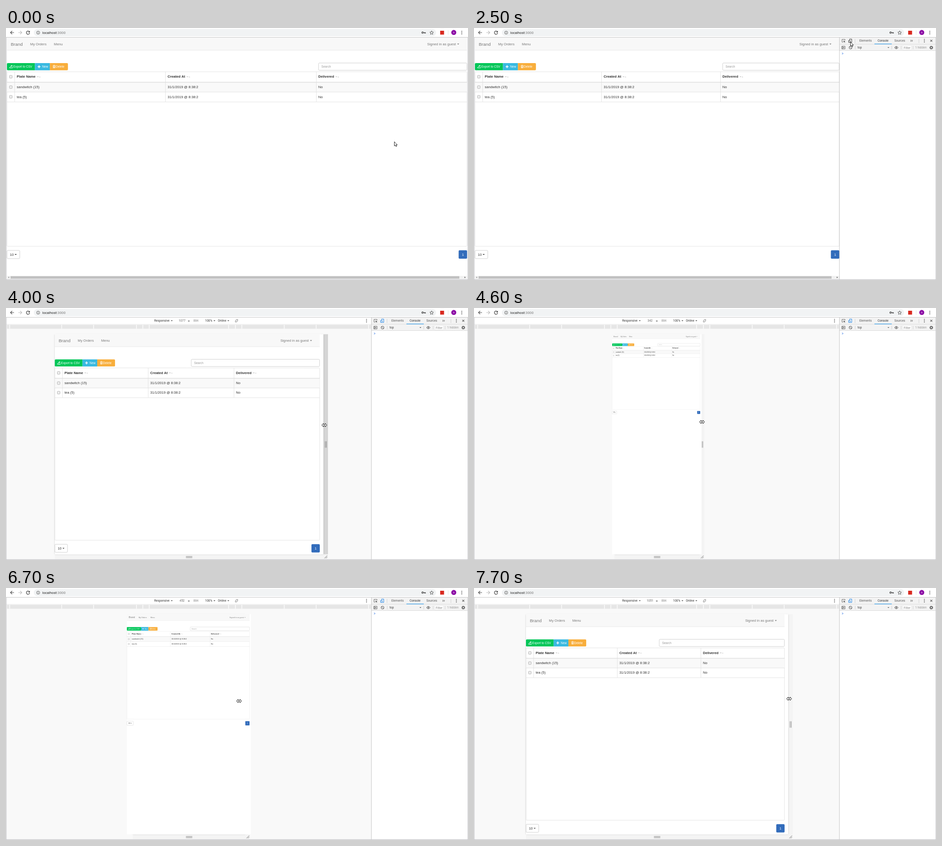
Recreate the animation shown at these times as an HTML page with a canvas. Size 1013 by 553 pixels, loop 8000 ms.

```html
<!DOCTYPE html>
<html lang="en">
<head>
<meta charset="utf-8">
<title>Orders</title>
<style>
html, body { margin: 0; width: 100%; height: 100%; overflow: hidden; background: #fff; }
canvas { display: block; }
</style>
</head>
<body>
<canvas id="stage" width="1013" height="553"></canvas>
<script>
const ctx = document.getElementById('stage').getContext('2d');
const LOOP = 8000;
const SANS = '"Liberation Sans", Arial, sans-serif';
const UI = 'Roboto, sans-serif';

// Pointer stops before the drag: time, x, y
const POINTER = [[0, 851, 249], [500, 795, 254], [700, 795, 255]];
// Drag stops: time, device left, page left, cursor x, cursor y
const DRAG = [
  [2700, 107, 107, 698, 257],
  [4300, 200, 192, 608, 254],
  [4600, 308, 303, 500, 250],
  [5000, 348, 344, 460, 246],
  [5200, 351, 351, 457, 244],
  [5600, 259, 267, 559, 241],
  [6400, 111, 107, 695, 245],
  [6700, 278, 265, 511, 248],
  [7000, 312, 313, 498, 247],
  [7400, 160, 166, 650, 244],
  [7700, 114, 114, 691, 243]
];

const at = (stops, t) => stops.filter(s => s[0] <= t).pop();

function rect(x, y, w, h, color) {
  ctx.fillStyle = color;
  ctx.fillRect(x, y, w, h);
}

function box(x, y, w, h, r, fill, stroke, lineWidth = 0.8) {
  ctx.beginPath();
  ctx.roundRect(x, y, w, h, r);
  ctx.fillStyle = fill;
  ctx.fill();
  if (!stroke) return;
  ctx.strokeStyle = stroke;
  ctx.lineWidth = lineWidth;
  ctx.stroke();
}

// y is the middle of the capitals
function text(str, x, y, size, color, font = SANS, align = 'left', weight = '') {
  ctx.font = `${weight} ${size}px ${font}`;
  ctx.textAlign = align;
  ctx.fillStyle = color;
  ctx.fillText(str, x, y + size * 0.36);
  return ctx.measureText(str).width;
}

function icon(d, x, y, stroke, fill, lineWidth = 1) {
  const path = new Path2D(d);
  ctx.save();
  ctx.translate(x, y);
  if (fill) { ctx.fillStyle = fill; ctx.fill(path); }
  if (stroke) { ctx.strokeStyle = stroke; ctx.lineWidth = lineWidth; ctx.stroke(path); }
  ctx.restore();
}

const caret = (x, y, color, r = 2.2, dir = 1) =>
  icon(`M${-r} ${-dir * r / 2}H${r}L0 ${dir * r / 2}Z`, x, y, null, color);

const circle = r => `M${r} 0A${r} ${r} 0 1 1 ${-r} 0A${r} ${r} 0 1 1 ${r} 0Z`;

function dots(x, y, color) {
  for (const dy of [-3, 0, 3]) icon(circle(0.9), x, y + dy, null, color);
}

function page(x, y, W, k) {
  const size = 7.66, small = 6.56;
  ctx.save();
  ctx.translate(x, y);
  ctx.scale(k, k);

  rect(0, 0, W, 28, '#f8f8f8');
  rect(0, 27.4, W, 0.8, '#e3e3e3');
  text('Brand', 8.5, 14, 9.85, '#777');
  text('My Orders', 51, 14, size, '#777');
  text('Menu', 103, 14, size, '#777');
  text('Signed in as guest', W - 87.5, 14, size, '#777');
  caret(W - 19.5, 14.3, '#777');

  box(0, 56, 61.5, 15.8, [2, 0, 0, 2], '#00c658');
  rect(61.5, 56, 32.7, 15.8, '#39b9e0');
  box(94.2, 56, 39.6, 15.8, [0, 2, 2, 0], '#f8ae3c');
  icon('M-3 1.5V3H3V1.5M-1.5 1Q-1 -1.5 1.5 -1.5', 9, 63.5, '#fff', null, 1.1);
  icon('M1 -3.3L3.6 -1.3L1 .5Z', 9, 63.5, null, '#fff');
  icon('M-3 0H3M0 -3V3', 70.5, 63.8, '#fff', null, 1.7);
  icon('M-2 -1.5V3H2V-1.5M-2.8 -2.2H2.8M-1 -3.1H1M-.7 -1V2.5M.7 -1V2.5', 103.5, 63.5, '#fff', null, 0.8);
  text('Export to CSV', 14, 63.7, small, '#fff');
  text('New', 77.3, 63.7, small, '#fff');
  text('Delete', 107, 63.7, small, '#fff');

  const left = W > 700 ? W * 2 / 3 + 10.6 : W / 2 + 8.8;
  box(left, 55.8, W - left - 0.4, 16, 2, '#fff', '#c4c4c4');
  text('Search', left + 6.3, 63.7, small, '#999');

  box(0.2, 75, W - 0.4, 383, 1.5, '#fff', '#ddd');
  rect(0.5, 98, W - 1, 21.5, '#f9f9f9');
  rect(0, 97.4, W, 1.2, '#d8d8d8');
  rect(0, 119.2, W, 0.8, '#ddd');
  rect(0, 140.8, W, 0.8, '#ddd');
  const col = (W - 17) / 3;
  const rows = [
    ['Plate Name', 'sandwitch (15)', 'tea (5)'],
    ['Created At', '31/1/2019 @ 8:38:2', '31/1/2019 @ 8:38:2'],
    ['Delivered', 'No', 'No']
  ];
  rows.forEach(([head, ...cells], i) => {
    const cx = 17 + i * col;
    rect(cx - 0.4, 75, 0.8, 66, '#ddd');
    const end = cx + 4.5 + text(head, cx + 4.5, 85.7, size, '#333', SANS, 'left', 'bold');
    caret(end + 5, 86.2, '#ccc');
    caret(end + 9.3, 86.2, '#ccc', 1.9, -1);
    cells.forEach((cell, r) => text(cell, cx + 4.5, 108.5 + r * 21.4, size, '#333'));
  });
  for (const cy of [86, 108.7, 130]) box(5.6, cy - 3, 6, 6, 1.2, '#eee', '#a5a5a5');

  box(0.2, 467, 28, 18, 2, '#fff', '#c4c4c4');
  text('10', 6.5, 476, size, '#333');
  caret(19.3, 476.2, '#333');
  box(W - 18.5, 466.8, 18.5, 18.4, 2, '#326cbb');
  text('1', W - 9.2, 476, size, '#fff', SANS, 'center');
  ctx.restore();
}

function browserBar() {
  rect(0, 0, 1013, 20, '#fff');
  icon('M4 0H-3.5M0 -3.7L-3.7 0L0 3.7', 13.5, 10, '#444', null, 1.2);
  icon('M-4 0H3.5M0 -3.7L3.7 0L0 3.7', 31, 10, '#bbb', null, 1.2);
  icon('M3 -1.8A3.6 3.6 0 1 0 3.5 1', 48.3, 10, '#444', null, 1.2);
  icon('M4 -4V-.3H.3Z', 48.3, 10, null, '#444');
  box(61, 2.3, 882, 15.6, 7.8, '#f1f3f4');
  icon(circle(3.4) + 'M0 -.6V2M0 -2.1V-1.2', 70.5, 10.2, '#555', null, 0.9);
  const w = text('localhost', 79.5, 10.3, 7.75, '#222', UI);
  text(':3000', 79.5 + w, 10.3, 7.75, '#777', UI);
  icon(circle(1.7) + 'M1.8 0H6.2V1.7M4.4 0V1.7', 913.4, 10.2, '#444', null, 1.3);
  icon('M0 -4L1.2 -1.3L4 -1L1.9 .9L2.5 3.8L0 2.3L-2.5 3.8L-1.9 .9L-4 -1L-1.2 -1.3Z', 933.3, 10.2, '#444', null, 0.9);
  rect(952, 6, 8.5, 8.5, '#d8291f');
  rect(969, 5, 0.8, 10, '#ddd');
  icon(circle(5.5), 981.8, 9.8, null, '#8a06a4');
  text('A', 981.8, 9.9, 5.6, '#fff', UI, 'center');
  dots(999.4, 10.2, '#444');
  rect(0, 20, 1013, 1, '#c6c6c6');
}

function scrollbar(right) {
  rect(2, 544, right - 2, 7, '#f1f1f1');
  rect(10, 544.6, right - 27, 5.6, '#c1c1c1');
  icon('M1 -1.8V1.8L-1.2 0Z', 5.8, 547.3, null, '#888');
  icon('M-1 -1.8V1.8L1.2 0Z', right - 4.5, 547.3, null, '#444');
}

function devtools(t) {
  const grey = '#5a5a5a', device = t >= 2700 ? '#1a83e8' : t >= 2500 ? '#333' : '#6e6e6e';
  rect(801, 21, 212, 531, '#fff');
  rect(801, 21, 212, 15, '#f3f3f3');
  rect(801, 35.5, 212, 0.8, '#ccc');
  icon('M3 -1V-3H-3.5V3H-1', 810.5, 28, grey, null, 0.9);
  icon('M-.5 -.5L3.8 1.3L2 2L3.5 3.5L2.8 4L1.4 2.6L.7 4Z', 810.5, 28, null, grey);
  icon('M-1.5 -2V-3.7H3.2V3.7H.5M-3.6 -.7H-.2V3.7H-3.6Z', 825, 28, device, null, 1);
  rect(835, 24, 0.8, 9, '#ccc');
  text('Elements', 845, 28, 6.56, grey, UI);
  text('Console', 885, 28, 6.56, '#333', UI);
  text('Sources', 921.7, 28, 6.56, grey, UI);
  rect(878, 34.4, 38, 1.3, '#3ba0e8');
  icon('M-2.5 -2L-.5 0L-2.5 2M.3 -2L2.3 0L.3 2', 959.5, 28, grey, null, 1);
  rect(975, 24, 0.8, 9, '#ccc');
  dots(987.5, 28, grey);
  icon('M-2.2 -2.2L2.2 2.2M2.2 -2.2L-2.2 2.2', 1002.7, 28, grey, null, 1.1);

  if (t >= 1400) {
    rect(801, 36.3, 212, 13, '#f3f3f3');
    rect(801, 49, 212, 0.7, '#ccc');
    icon('M-3.5 -3H3.5V3H-3.5ZM-1.7 -3V3', 810, 43, grey, null, 0.9);
    icon('M-.3 -1.7L2.3 0L-.3 1.7Z', 810, 43, null, grey);
    icon(circle(3.2) + 'M-2.3 -2.3L2.3 2.3', 825.6, 43, grey, null, 1);
    rect(835.5, 39, 0.8, 8, '#ccc');
    text('top', 841, 43, 6.56, '#444', UI);
    caret(908.7, 43, grey, 2);
    rect(915.5, 39, 0.8, 8, '#ccc');
    icon('M-4 0Q0 -5.4 4 0Q0 5.4 -4 0Z', 926, 43, grey, null, 1);
    icon(circle(1.4), 926, 43, null, grey);
    rect(936, 39, 0.8, 8, '#ccc');
    box(940, 38.3, 19, 9.6, 1, '#fff', '#ddd', 0.6);
    text('Filter', 942.2, 43.2, 6.56, '#888', UI);
    rect(962.5, 39, 0.8, 8, '#ccc');
    text('1 hidden', 967.3, 43, 6.56, '#999', UI);
    icon(circle(2.3), 1002.7, 43, grey, null, 1.6);
    ctx.setLineDash([1.3, 1.25]);
    icon(circle(3.3), 1002.7, 43, grey, null, 1.3);
    ctx.setLineDash([]);
    icon('M-1.4 -1.8L1.2 0L-1.4 1.8', 808.3, 56, '#4b86e8', null, 1);
  }
  rect(800.8, 21, 0.8, 531, '#b8b8b8');
}

function emulator(t) {
  const [, left, px] = at(DRAG, t);
  const right = 803 - left, width = right - left;
  const pw = px < 135 ? 795 - 2 * px : 799 - 2 * px;
  const k = Math.min(0.987, pw / 535);
  const hover = t >= 4000 && t < 4300;

  rect(1, 21, 800, 531, '#f9f9f9');
  rect(1, 21, 800, 15, '#fff');
  text('Responsive', 325, 28, 6.56, '#333', UI);
  caret(363.5, 28, '#444', 2);
  text(Math.round(width / 0.547), 386, 28, 6.56, '#666', UI, 'center');
  text('×', 401, 28, 8, '#444', UI, 'center');
  text('884', 416.5, 28, 6.56, '#888', UI, 'center');
  text('100%', 436.5, 28, 6.56, '#333', UI);
  caret(457, 28, '#444', 2);
  text('Online', 464.5, 28, 6.56, '#333', UI);
  caret(487.5, 28, '#444', 2);
  icon('M-2.5 -.8L.8 -2.5L2.5 .8L-.8 2.5ZM-3.4 1A3.5 3.5 0 0 0 -.5 3.5M3.4 -1A3.5 3.5 0 0 0 .5 -3.5', 505.5, 28, '#777', null, 0.8);
  dots(790.5, 28, '#5a5a5a');

  rect(1, 35.6, 800, 0.6, '#ddd');
  rect(2, 37, 798, 8.5, '#e6e6e6');
  for (const x of [8, 122, 192, 286, 300, 314, 488, 503, 517, 610, 680, 795]) rect(x - 0.6, 37, 1.3, 8.5, '#fff');

  rect(right, 57.5, 10, 483, hover ? '#d5d5d5' : '#f4f4f4');
  rect(left, 541, width + 10, 10, '#f4f4f4');
  icon('M-1.3 -7V7M1.3 -7V7', right + 5.3, 299.5, '#777', null, 0.9);
  icon('M-7 -1.3H7M-7 1.3H7', 401.5, 546.6, '#777', null, 0.9);
  icon('M-3 3L3 -3M0 3L3 0', right + 5.3, 546.3, '#666', null, 0.9);

  ctx.save();
  ctx.shadowColor = 'rgba(0,0,0,.18)';
  ctx.shadowBlur = 3;
  rect(left, 57.5, width, 483, '#fff');
  ctx.restore();
  rect(px, 57.5, pw + 3, 483, '#fff');
  page(px, 57.5, pw / k, k);
}

function arrow(x, y) {
  icon('M0 0V9.3L2.1 7.4L3.6 10.6L5.2 9.9L3.7 6.9H6.5Z', x + 0.5, y + 0.6, '#111', '#fff', 0.9);
}

function cursor(t) {
  if (t >= 4000) {
    const [, , , x, y] = at(DRAG, t);
    icon('M-5.6 0L-2 -3.7V-1.4H2V-3.7L5.6 0L2 3.7V1.4H-2V3.7Z', x, y, '#111', '#fff', 1);
  } else if (t >= 2800) {
    arrow(747, 262);
  } else if (t >= 1400) {
    const p = Math.min(1, (Math.floor(t / 100) - 13) / 8);
    const e = p * p * (3 - 2 * p);
    arrow(795 + 30 * e, 255 - 225 * e);
  } else {
    const [, x, y] = at(POINTER, t);
    arrow(x, y);
  }
}

function draw(t) {
  rect(0, 0, 1013, 553, '#fff');
  if (t >= 2700) {
    emulator(t);
  } else {
    const right = t < 1300 ? 1011 : 801;
    page(2, 21, right - 2, 1);
    scrollbar(right);
  }
  if (t >= 1300) devtools(t);
  browserBar();
  rect(0, 21, 1.2, 532, '#d0d0d4');
  rect(1012, 21, 1, 532, '#d0d0d4');
  rect(0, 551.6, 1013, 1.4, '#c8c8cc');
  cursor(t);
}

const start = performance.now();
function tick() {
  draw((performance.now() - start) % LOOP);
  requestAnimationFrame(tick);
}
tick();
</script>
</body>
</html>
```
